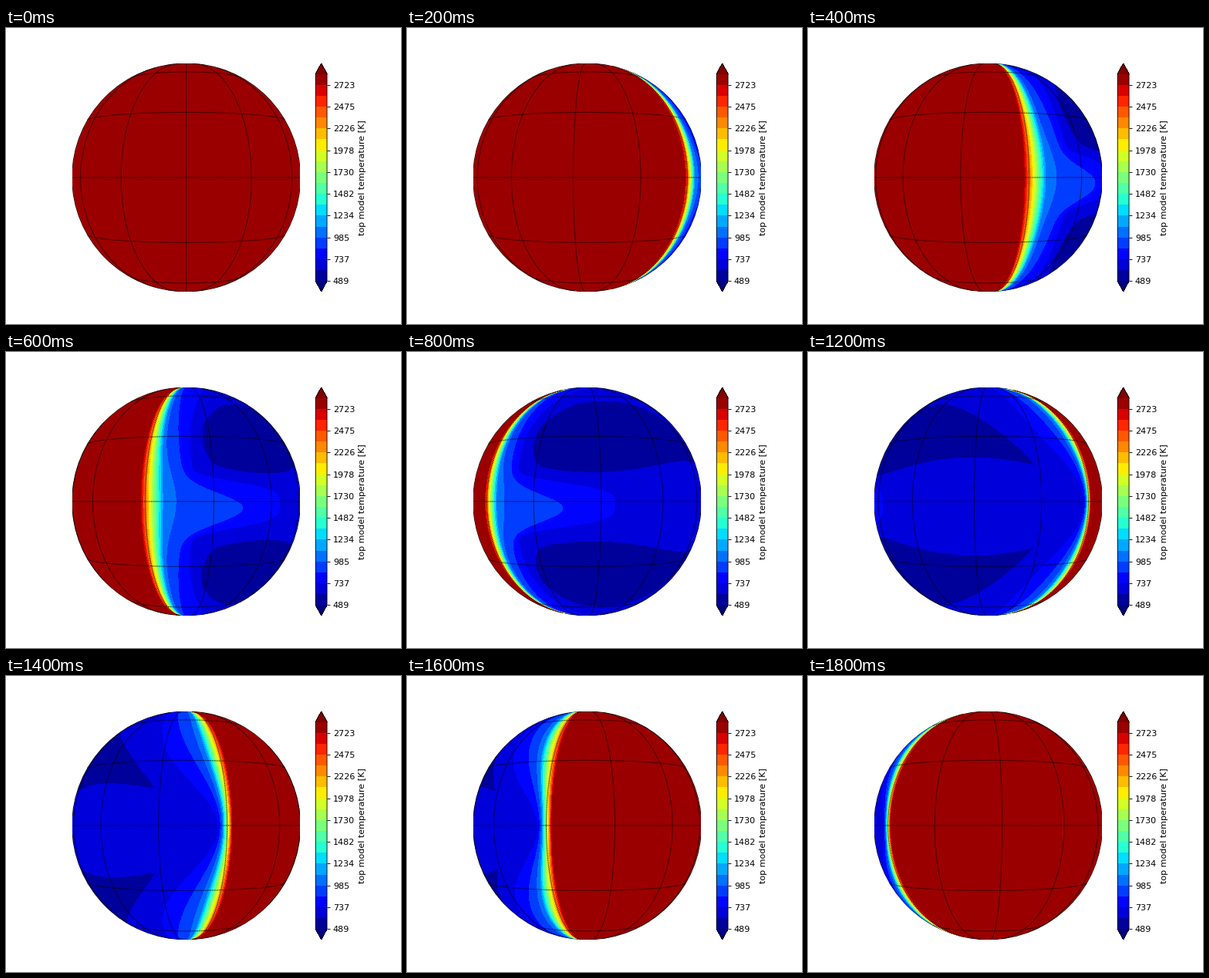
A matplotlib script that plays this animation: 512 px wide and 384 px high, repeating every 2000 ms.

```python
import numpy as np
import matplotlib.pyplot as plt
from matplotlib.animation import FuncAnimation
from matplotlib.patches import Circle

FRAMES = 10
TURN = 360 / FRAMES          # degrees of rotation per frame
SAT = 6.617                  # geostationary distance in planet radii
LIMB = np.arcsin(1 / SAT)    # angular radius of the disc
LEVELS = 489 + 124.1 * np.arange(20)
DAY, NIGHT = 2785, 675
KNOT_TEMPS = [DAY, *LEVELS[18:1:-1], NIGHT]


def bump(lat, width, power=2):
    return np.exp(-np.abs(lat / width) ** power)


def hot_edge(start, end, power):
    return [start + (end - start) * u**power for u in np.linspace(0, 1, 14)]


def excess(lon, knots, sign):
    """Heat above the night level, falling from knot to knot."""
    total = np.zeros_like(lon)
    for a, b, hot, cold in zip(knots, knots[1:], KNOT_TEMPS, KNOT_TEMPS[1:]):
        total += (hot - cold) * np.clip(sign * (b - lon) / (sign * (b - a)), 0, 1)
    return total


def patch_depth(lon, lat, inner_lat):
    """Degrees inside a cold crescent on the night side, negative outside."""
    s = np.clip((lon - 116) / 122, 0, 1)
    inner = inner_lat - 3.4 * np.sin(2 * np.pi * s) + 10 * np.exp(-s / 0.02)
    outer = inner + 93 * s**0.4 * (1 - s) ** 0.9
    outside = np.maximum(0, np.abs(lon - 177) - 61)
    return np.minimum(lat - inner, outer - lat) - outside


def temperature(lon, lat):
    polar = (lat / 75) ** 4

    # each knot is the longitude of one contour, from day to night
    e737 = 108.5 + 3 * bump(lat, 22) + 44.5 * bump(lat + 1.5, 10.5, 4) + 30 * polar
    east = [85.5 + 0 * lat,
            *hot_edge(87.8, 95.7 + 2.1 * bump(lat, 25), 1.1),
            97.7 + 5.8 * bump(lat, 17),
            103 + 4 * bump(lat, 25) + 26.5 * bump(lat + 3, 8.5),
            e737, e737 + 8]

    w737 = 236 + 30 * bump(lat + 1, 29) - 12 * polar
    west = [275 + 0 * lat,
            *hot_edge(272.4, 260.5 + 7.8 * bump(lat, 32), 1.15),
            256 + 11.7 * bump(lat, 34),
            247 + 20 * bump(lat, 35) - 8 * polar,
            w737, w737 - 8]

    temp = NIGHT + excess(lon, east, 1) + excess(lon, west, -1)
    for depth in (patch_depth(lon, lat, 16), patch_depth(lon, -lat, 20.8)):
        temp = np.minimum(temp, LEVELS[1] - 100 * depth)
    return np.maximum(temp, 520)


def project(lon, lat):
    """Disc coordinates in -1..1, nan behind the limb."""
    lon, lat = np.radians(lon), np.radians(lat)
    vx, vy = np.cos(lat) * np.cos(lon), np.cos(lat) * np.sin(lon)
    vz = np.sin(lat) + 0 * vx
    x = np.arctan2(vy, SAT - vx) / LIMB
    y = np.arctan2(vz, np.hypot(vy, SAT - vx)) / LIMB
    hidden = vx < 1 / SAT
    return np.where(hidden, np.nan, x), np.where(hidden, np.nan, y)


def unproject(x, y):
    """Longitude and latitude seen at a disc point, held at the limb outside."""
    x, y = x * LIMB, y * LIMB
    cos_off = np.cos(x) * np.cos(y)
    dist = SAT * cos_off - np.sqrt(np.maximum(0, 1 - SAT**2 * (1 - cos_off**2)))
    px = SAT - dist * cos_off
    py = dist * np.cos(y) * np.sin(x)
    pz = dist * np.sin(y)
    return np.degrees(np.arctan2(py, px)), np.degrees(np.arctan2(pz, np.hypot(px, py)))


side = np.linspace(-1, 1, 420)
X, Y = np.meshgrid(side, side)
LON, LAT = unproject(X, Y)

fig, ax = plt.subplots(figsize=(6.4, 4.8), dpi=80, facecolor="white")
ax.set(xlim=(-1, 1), ylim=(-1, 1), aspect="equal")
ax.set_autoscale_on(False)
ax.axis("off")
# the field covers the inner half of the outline
limb = ax.add_patch(Circle((0, 0), 1, fill=False, ec="black", lw=1, zorder=0))


def draw_field(frame):
    temp = temperature((LON + TURN * frame) % 360, LAT)
    field = ax.contourf(X, Y, temp, LEVELS, cmap="jet", extend="both")
    field.set_clip_path(limb)
    return field


def grid_line():
    return ax.plot([], [], color="black", lw=1, dashes=(1, 1), zorder=3, snap=False)[0]


field = draw_field(0)
bar = fig.colorbar(field, ax=ax, ticks=LEVELS[::2], format="%.0f")
bar.minorticks_off()
bar.set_label("top model temperature [K]")

around = np.linspace(-90, 90, 721)
for parallel in (-80, -60, -30, 0, 30, 60, 80):
    grid_line().set_data(*project(around, parallel))

along = np.linspace(-80, 80, 641)
meridians = {lon: grid_line() for lon in range(0, 360, 30)}


def update(frame):
    global field
    field.remove()
    field = draw_field(frame)
    for lon, line in meridians.items():
        line.set_data(*project(lon - TURN * frame, along))
    return [field, *meridians.values()]


anim = FuncAnimation(fig, update, frames=FRAMES, interval=200, repeat=True)
plt.show()
```
